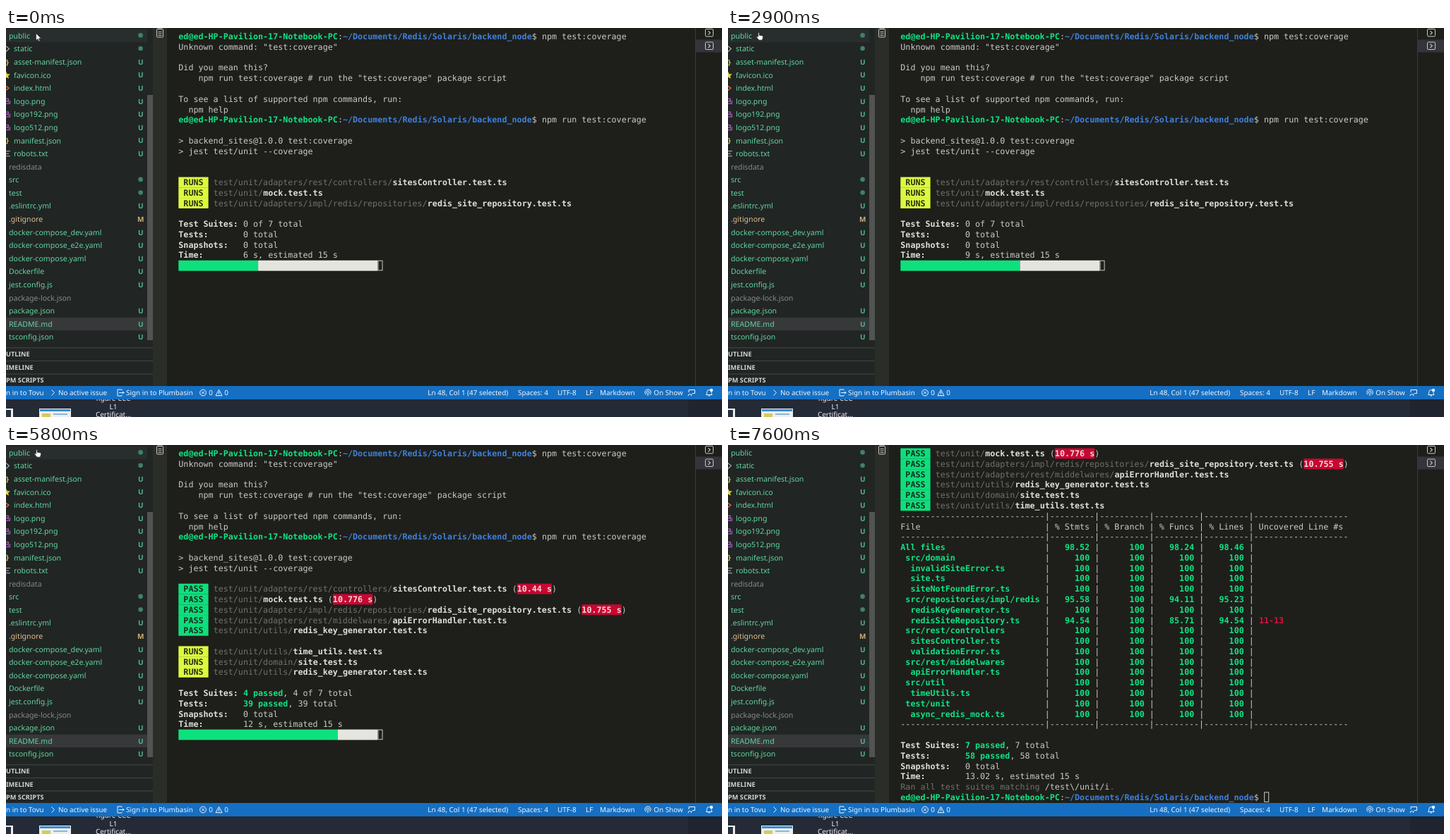
Write an HTML page that moves like this. It is 1014 px wide and 552 px high and loops after 7.7 s.

```html
<!DOCTYPE html>
<html lang="en">
<head>
<meta charset="utf-8">
<title>Test coverage run</title>
<style>
html, body { margin: 0; width: 100%; height: 100%; overflow: hidden; background: #1e1f1a; }
svg { display: block; width: 1014px; height: 552px; }
text { white-space: pre; text-rendering: geometricPrecision; }
.term { font: 11.71px "DejaVu Sans Mono", monospace; }
.ui { font-family: "Noto Sans", "Open Sans", sans-serif; }
</style>
</head>
<body>
<svg id="stage" viewBox="0 0 1014 552" xmlns="http://www.w3.org/2000/svg">
  <g id="back"></g>
  <rect id="hover" width="200" height="18.6" fill="#282e2e"/>
  <g id="side" class="ui"></g>
  <g id="term" class="term"></g>
  <g id="bars" class="ui"></g>
  <g id="arrow"><path d="M0 0V10.2L2.4 8 4 11.6 5.6 10.9 4 7.4H7.2Z" fill="#fff" stroke="#222" stroke-width=".7"/></g>
  <g id="hand"><path d="M2.6 .8Q3.6 0 4.2 1V4.2L8.6 5Q9.7 5.3 9.6 6.4L9 9.6 8.4 11.2H3.8L.6 7.2Q0 6 1.2 5.8L2.6 6.8Z" fill="#fff" stroke="#222" stroke-width=".7"/></g>
</svg>
<script>
const LOOP = 7700, CW = 7.05, RH = 14.78, X0 = 244.3, Y0 = 4.6;
const $ = id => document.getElementById(id);
const esc = s => s.replace(/&/g, '&amp;').replace(/</g, '&lt;').replace(/>/g, '&gt;');
const rect = (x, y, w, h, fill, more = '') =>
  `<rect x="${x}" y="${y}" width="${w}" height="${h}" fill="${fill}" ${more}/>`;
const line = (d, color, w = 1) =>
  `<path d="${d}" fill="none" stroke="${color}" stroke-width="${w}"/>`;
const label = (x, y, s, size, fill, more = '') =>
  `<text x="${x}" y="${y}" font-size="${size}" fill="${fill}" ${more}>${esc(s)}</text>`;

/* ---- editor frame ---- */
const rowY = i => 11 + i * 18.59;

function drawBack() {
  $('back').innerHTML =
    rect(0, 0, 1014, 552, '#1e1f1a') +
    rect(0, 0, 208, 508, '#212524') +
    rect(208, 0, 20, 508, '#2b2d29') +
    rect(0, 410.8, 208, 18.4, '#363839') +
    rect(976, 0, 1, 508, '#3a3b38') +
    rect(977, 16.5, 37, 18, '#34353b');
}

function treeIcon(kind, y) {
  switch (kind) {
    case '>': return line(`M0 ${y - 4}L4.5 ${y}L0 ${y + 4}`, '#b9bcb9', 1.1);
    case '}': return label(0, y + 3.6, '}', 10, '#d8cf54', 'font-weight="700"');
    case '*': return `<path d="M0 ${y - 5}L1.8 ${y - 1.6}L6 ${y - 1.2}L3 ${y + 1.2}L4 ${y + 5}L0 ${y + 3}Z" fill="#e2d64b"/>`;
    case 'h': return line(`M0 ${y - 3}L4 ${y}L0 ${y + 3}`, '#d96b3c', 1.3);
    case 'i': return line(`M0 ${y - 3.5}H3.5V${y}M0 ${y + 3.5}H5.5V${y - 1}M0 ${y + 1}L2 ${y - 1}L4 ${y + 2}`, '#a25cb8', 1.2);
    case 't': return line(`M0 ${y - 3.5}H6M0 ${y}H4M0 ${y + 3.5}H6`, '#b9bcb9', 1.1);
  }
  return '';
}

// name, state (o dot, U, M, - ignored), icon for nested entries
const files = `public o|static o >|asset-manifest.json U }|favicon.ico U *|index.html U h|logo.png U i|logo192.png U i|logo512.png U i|manifest.json U }|robots.txt U t|redisdata -|src o|test o|.eslintrc.yml U|.gitignore M|docker-compose_dev.yaml U|docker-compose_e2e.yaml U|docker-compose.yaml U|Dockerfile U|jest.config.js U|package-lock.json -|package.json U|README.md U|tsconfig.json U`
  .split('|').map(s => s.split(' '));

function drawSide() {
  let out = '';
  files.forEach(([name, state, icon], i) => {
    const y = rowY(i);
    const color = state === 'M' ? '#e2c08d' : state === '-' ? '#878a88' : '#62d6a0';
    out += treeIcon(icon, y) + label(icon ? 11 : 4, y + 3.8, name, 10.58, color);
    if (state === 'o') out += `<circle cx="190.6" cy="${y - .6}" r="3.3" fill="#3f8264"/>`;
    else if (state !== '-')
      out += label(190.8, y + 3.7, state, 10, state === 'M' ? '#cfae7c' : '#4fb68a', 'text-anchor="middle" font-weight="600"');
  });
  out += rect(200, 95, 8, 348, '#515453');
  ['UTLINE', 'IMELINE', 'PM SCRIPTS'].forEach((s, i) => {
    const y = 453.3 + i * 18.6;
    out += rect(0, y, 208, 1, '#444847') + label(0, y + 12.8, s, 9.2, '#d2d4d2', 'font-weight="700"');
  });
  out += rect(213.5, 1.5, 9, 11.5, 'none', 'stroke="#c3c5c0" rx="1"') +
    line('M215.5 0V2.5M218 0V2.5M220.5 0V2.5M215.5 5.5H220.5M215.5 8H220.5M215.5 10.5H220.5', '#c3c5c0', .9);
  for (const y of [1.5, 20])
    out += rect(990.5, y, 11, 10.5, 'none', 'stroke="#c8c9c5" rx="1.5"') +
      line(`M994.5 ${y + 2.6}L997.3 ${y + 5.3}L994.5 ${y + 8}`, '#c8c9c5', 1.1);
  $('side').innerHTML = out;
}

function drawBars() {
  const W = '#f2f6fa', st = (x, s) => label(x, 521, s, 9.87, W);
  let out = rect(0, 527, 1014, 25, '#242a36') + rect(966, 527, 48, 25, '#1f242f');
  const desk = (y, s) => label(152, y, s, 10, '#eef0f2', 'text-anchor="middle"');
  out += desk(528.5, 'figure CCC') + desk(541, 'L1') + desk(552.3, 'Certificat…');
  out += rect(0, 540, 10, 12, '#e9ecee') + rect(0, 542, 7, 10, '#27313d') +
    rect(47, 540, 45, 12, '#eceff0') + rect(48, 541, 43, 3, '#3d8ed0') +
    rect(51, 547, 12, 5, '#d9c85e') + rect(67, 547, 20, 2, '#8fb7d6');
  out += rect(0, 508, 1014, 19, '#156fc3');
  out += st(0, 'n in to Tovu') + st(74, 'No active issue') + st(170, 'Sign in to Plumbasin') +
    st(287.3, '0') + st(309.3, '0') + st(597.3, 'Ln 48, Col 1 (47 selected)') + st(725, 'Spaces: 4') +
    st(781, 'UTF-8') + st(821, 'LF') + st(841, 'Markdown') + st(917.3, 'On Show');
  out += line('M64.5 513.5L68.5 517.5L64.5 521.5', W) +
    line('M164 514V513H158V522H164V521M160 517.5H167M165 515.5L167 517.5L165 519.5', W) +
    '<circle cx="279" cy="517.5" r="4.4" fill="none" stroke="#f2f6fa"/>' +
    line('M277.2 515.7L280.8 519.3M280.8 515.7L277.2 519.3', W) +
    line('M301.5 513.2L306 521.7H297Z M301.5 516V519M301.5 519.7V520.6', W) +
    line('M906.5 520.5A4.2 4.2 0 1 1 911.5 520.5M907.5 518.5A2 2 0 1 1 910.5 518.5M909 517.5V522', W) +
    line('M967 517V513.5H975.5V518.5H972.5L970.5 520.5M966 522Q966 519.5 968.5 519.5Q970.5 519.5 970.8 522', W) +
    line('M991.5 520.5H1000L999 518.5V516.5Q998.5 513.5 995.8 513.5Q993 513.5 992.6 516.5V518.5ZM994.5 522H997', W) +
    '<circle cx="999" cy="514" r="2.2" fill="#f2f6fa"/>';
  $('bars').innerHTML = out;
}

/* ---- terminal: ^x switches style ---- */
const FG = '#c9cac4', GREEN = '#0ee485';
const styles = {
  n: { fill: FG }, d: { fill: '#6f716b' }, b: { fill: '#dfe0da', bold: 1 },
  g: { fill: GREEN, bold: 1 }, u: { fill: '#3f80de', bold: 1 }, e: { fill: '#dc123f', bold: 1 },
  p: { fill: '#14301f', bold: 1, bg: '#0fde7d' }, y: { fill: '#2a2f10', bold: 1, bg: '#dcf93e' },
  r: { fill: '#ecdcdc', bold: 1, bg: '#c90632' },
  G: { bg: '#0fe07e' }, W: { bg: '#e4e5df' }
};

const prompt = '^ged@ed-HP-Pavilion-17-Notebook-PC^n:^u~/Documents/Redis/Solaris/backend_node^n$ ';
const intro = [
  prompt + 'npm test:coverage', 'Unknown command: "test:coverage"', '', 'Did you mean this?',
  '    npm run test:coverage # run the "test:coverage" package script', '',
  'To see a list of supported npm commands, run:', '  npm help',
  prompt + 'npm run test:coverage', '', '> backend_sites@1.0.0 test:coverage', '> jest test/unit --coverage', ''
];

const suites = {
  sites: ['adapters/rest/controllers/', 'sitesController', '10.44 s'],
  mock: ['', 'mock', '10.776 s'],
  repo: ['adapters/impl/redis/repositories/', 'redis_site_repository', '10.755 s'],
  api: ['adapters/rest/middelwares/', 'apiErrorHandler'],
  key: ['utils/', 'redis_key_generator'],
  time: ['utils/', 'time_utils'],
  site: ['domain/', 'site']
};
const PASS = '^p PASS ', RUNS = '^y RUNS ';
const suite = (tag, k) => {
  const [dir, name, took] = suites[k];
  return `${tag}^n ^dtest/unit/${dir}^b${name}.test.ts` + (took && tag === PASS ? `^n (^r${took}^n)` : '');
};
const words = s => s ? s.split(' ') : [];
const passed = s => words(s).map(k => suite(PASS, k));
const runs = s => words(s).map(k => suite(RUNS, k));

const tally = (n, all, tests, time) => [
  '^bTest Suites: ' + (n ? `^g${n} passed^n, ` : '^n') + all,
  '^bTests:       ' + (tests ? `^g${tests} passed^n, ` : '^n') + `${tests} total`,
  '^bSnapshots:   ^n0 total',
  `^bTime:        ^n${time} s, estimated 15 s`
];
const progress = sec => {
  const n = Math.floor(sec / 15 * 40);
  return '^G' + ' '.repeat(n) + '^W' + ' '.repeat(40 - n);
};
const live = (done, running, n, tests, sec) => [
  ...intro, ...passed(done), '', ...runs(running), ...(running ? [''] : []),
  ...tally(n, `${n} of 7 total`, tests, sec), progress(sec)
];
const cut = (rows, n) => [...rows.slice(0, n), ''];

const cols = [9, 10, 9, 9];
const rule = [29, ...cols, 19].map(n => '-'.repeat(n)).join('|');
const table = () => {
  const F = '100 100 100 100';
  const rows = [
    ['All files', '98.52 100 98.24 98.46'], [' src/domain', F], ['  invalidSiteError.ts', F], ['  site.ts', F],
    ['  siteNotFoundError.ts', F], [' src/repositories/impl/redis', '95.58 100 94.11 95.23'],
    ['  redisKeyGenerator.ts', F], ['  redisSiteRepository.ts', '94.54 100 85.71 94.54', ' 11-13'],
    [' src/rest/controllers', F], ['  sitesController.ts', F], ['  validationError.ts', F],
    [' src/rest/middelwares', F], ['  apiErrorHandler.ts', F], [' src/util', F], ['  timeUtils.ts', F],
    [' test/unit', F], ['  async_redis_mock.ts', F]
  ].map(([name, nums, miss = '']) => '^g' + name.padEnd(29) + '^n|' +
    nums.split(' ').map((v, i) => '^g' + v.padStart(cols[i] - 1) + ' ^n|').join('') + '^e' + miss);
  return [rule, 'File'.padEnd(29) + '| % Stmts | % Branch | % Funcs | % Lines | Uncovered Line #s', rule, ...rows, rule];
};

const all = 'sites mock repo api key site time';
const start = sec => live('', 'sites mock repo', 0, 0, sec);
const mid = live('sites', 'mock repo api', 1, 19, 11);
const late = (running, n, tests, sec) => live('sites mock repo api', running, n, tests, sec);
const five = live('sites mock repo api key', 'time site key', 4, 39, 12);
const report = [...intro, ...passed(all), ...table()];
const final = [...report, '', ...tally(7, '7 total', 58, '13.02'), '^dRan all test suites matching ^n/test\\/unit/i^d.'];

// start time and the screen shown from then on
const scenes = [
  [0, start(6)], [600, cut(start(6), 14)], [900, start(7)], [1600, cut(start(7), 14)], [1700, start(8)],
  [2600, cut(start(8), 18)], [2900, start(9)], [3600, cut(start(9), 15)], [3700, start(10)],
  [4600, cut(start(10), 13)], [4800, cut(mid, 14)], [4900, mid], [5100, cut(mid, 14)],
  [5200, late('repo api key', 3, 24, 11)], [5400, late('key time site', 4, 33, 11)],
  [5600, late('key time site', 4, 39, 12)], [5800, five], [5900, cut(five, 18)],
  [6000, live(all, '', 7, 58, 12)], [6200, [...intro, ...passed(all), '']],
  [6300, [...report, '']], [6500, [...final, '']], [6800, [...final, prompt]]
];

function drawTerm(rows) {
  let out = '', col = 0;
  rows.slice(-34).forEach((row, r) => {
    const y = Y0 + r * RH;
    col = 0;
    for (const part of ('^n' + row).split('^').slice(1)) {
      const s = styles[part[0]], txt = part.slice(1), x = X0 + col * CW;
      if (!txt) continue;
      if (s.bg) out += rect(x, y, txt.length * CW, RH + .1, s.bg);
      const lead = txt.length - txt.trimStart().length;
      if (txt.trim())
        out += `<text x="${x + lead * CW}" y="${y + 11.5}" fill="${s.fill}"${s.bold ? ' font-weight="700"' : ''}>${esc(txt.trim())}</text>`;
      col += txt.length;
    }
  });
  const y = Y0 + (Math.min(rows.length, 34) - 1) * RH;
  out += rect(X0 + col * CW + .7, y + .5, CW - 1, RH - 1.2, 'none', `stroke="${FG}"`);
  $('term').innerHTML = out;
}

/* ---- pointer ---- */
function drawPointer(t) {
  const step = Math.floor(t / 100) * 100;
  const k = Math.max(0, (step - 6800) / 700);
  const e = k * k * (3 - 2 * k);
  const x = 40 - 34 * e, y = 6 + 546 * e;
  const gone = k >= 1, early = t < 100, inTree = y < 446;
  const show = (id, on) => $(id).setAttribute('visibility', on ? 'visible' : 'hidden');
  show('arrow', !gone && (early || !inTree));
  show('hand', !gone && !early && inTree);
  $('arrow').setAttribute('transform', early ? 'translate(42.5 7.5)' : `translate(${x} ${y})`);
  $('hand').setAttribute('transform', `translate(${x} ${y})`);
  const row = Math.round((y - 6) / 18.59);
  show('hover', !gone && inTree && row !== 22);
  $('hover').setAttribute('y', rowY(row) - 9.3);
}

let shown = null;
function draw(t) {
  const rows = scenes.findLast(s => s[0] <= t)[1];
  if (rows !== shown) drawTerm(shown = rows);
  drawPointer(t);
}

drawBack();
drawSide();
drawBars();
const t0 = performance.now();
function tick() {
  draw((performance.now() - t0) % LOOP);
  requestAnimationFrame(tick);
}
tick();
</script>
</body>
</html>
```
